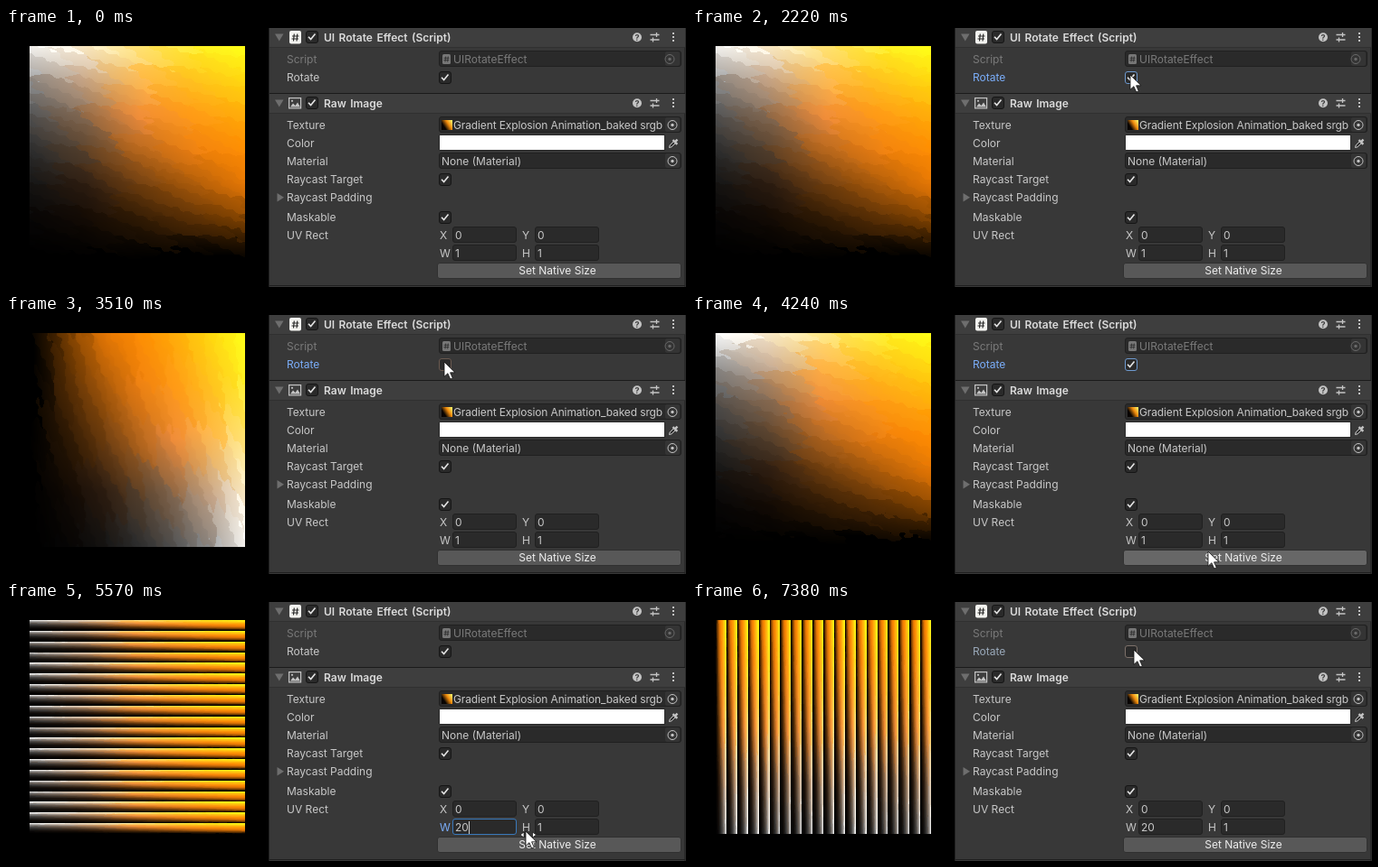
An HTML page with a canvas for the animation above (8000 ms loop, 751 by 287 pixels).

```html
<!DOCTYPE html>
<html lang="en">
<head>
<meta charset="utf-8">
<title>UI rotate effect</title>
<style>
html, body { margin: 0; width: 100%; height: 100%; overflow: hidden; background: #000; }
canvas { position: absolute; left: 26px; top: 20px; }
svg { position: absolute; left: 0; top: 0; }
text { font: 12px Inter, Roboto, sans-serif; fill: #c8c8c8; white-space: pre; }
.bold { font-weight: 600; fill: #dcdcdc; word-spacing: 1.4px; }
.dim { fill: #7a7a7a; }
.bright { fill: #eee; }
.tight { letter-spacing: -.13px; }
</style>
</head>
<body>
<canvas id="pic" width="238" height="237"></canvas>
<svg id="ui" width="751" height="287" viewBox="0 0 751 287">
  <defs>
    <linearGradient id="thumb" x1="0" y1=".6" x2="1" y2="0">
      <stop offset=".15" stop-color="#080402"/>
      <stop offset=".55" stop-color="#f08a0c"/>
      <stop offset=".9" stop-color="#ffe860"/>
    </linearGradient>
  </defs>
</svg>
<script>
const LOOP = 8000, W = 238, H = 237;
const ui = document.getElementById('ui');
const ctx = document.getElementById('pic').getContext('2d');

function add(tag, attrs, parent = ui) {
  const el = document.createElementNS('http://www.w3.org/2000/svg', tag);
  for (const k in attrs) el.setAttribute(k, attrs[k]);
  parent.appendChild(el);
  return el;
}
const rect = (x, y, width, height, fill, more) => add('rect', { x, y, width, height, fill, ...more });
const path = (d, more, parent) => add('path', { d, fill: 'none', ...more }, parent);
function text(x, y, str, more) {
  const el = add('text', { x, y, ...more });
  el.textContent = str;
  return el;
}

// ---- Inspector widgets ----
function box(x, y, w, h, fill = '#2a2a2a', stroke = '#202020') {
  return rect(x + .5, y + .5, w - 1, h - 1, fill, { rx: 2.5, stroke });
}
function check(x, y) {
  const frame = box(x, y, 14, 14, '#2a2a2a', '#151515');
  const tick = path(`M${x + 3} ${y + 6.7}l2.600 2.800 4.900-6`, { stroke: '#e4e4e4', 'stroke-width': 1.6 });
  return { frame, tick };
}
function objectField(y, color = '#c4c4c4', cx = 736) {
  box(478, y, 268, 18);
  rect(728, y + 1, 16, 16, '#343434', { rx: 2 });
  add('circle', { cx, cy: y + 9.5, r: 5, fill: 'none', stroke: color });
  add('circle', { cx, cy: y + 9.5, r: 1.7, fill: color });
}
function numField(x, y, name, value) {
  const label = text(x - 14, y + 14, name);
  const frame = box(x, y, 71, 18);
  const mark = rect(x + 3, y + 2, 7, 14, '#3a72b0', { visibility: 'hidden' });
  return { label, frame, mark, value: text(x + 3, y + 14, value) };
}
function header(y, title) {
  rect(291, y, 459, 21, '#3e3e3e');
  rect(291, y + 21, 459, 1, '#303030');
  path(`M297 ${y + 6.5}h9.5l-4.750 8z`, { fill: '#6e6e6e' });
  check(331, y + 3);
  text(351, y + 15, title, { class: 'bold' });
  add('circle', { cx: 697, cy: y + 10.3, r: 5, fill: '#c4c4c4' });
  text(697, y + 13.8, '?', { 'text-anchor': 'middle', style: 'font-size:9px;font-weight:700;fill:#3e3e3e' });
  path(`M711.5 ${y + 7.5}h10M711.5 ${y + 13}h10M718.5 ${y + 5}v5M714.5 ${y + 10.5}v5`, { stroke: '#c4c4c4', 'stroke-width': 1.3 });
  for (const d of [6, 10, 14]) rect(736, y + d - 1, 2, 2, '#c4c4c4');
}

rect(290, 0, 461, 287, '#383838');
rect(290, 0, 1, 287, '#222');
rect(749, 0, 2, 287, '#2a2a2a');
header(0, 'UI Rotate Effect (Script)');
rect(291, 72, 459, 1, '#1a1a1a');
header(73, 'Raw Image');
rect(291, 285, 459, 1, '#1f1f1f');

// Component icons
rect(313, 3, 13, 14.5, '#f4f4f0', { rx: 2 });
path('M318.300 6.500l-.8 8M321.800 6.500l-.8 8M316 9h7.500M315.500 12h7.500', { stroke: '#2a2a2a', 'stroke-width': 1.2 });
rect(312.6, 77.6, 13, 11.3, 'none', { stroke: '#c4c4c4', 'stroke-width': 1.2 });
path('M314 87.500l3-4 2.500 2.500 2.500-3.500 3 5z', { fill: '#c4c4c4' });
add('circle', { cx: 316, cy: 80.8, r: 1.1, fill: '#c4c4c4' });

const labels = { Script: 39, Rotate: 59, Texture: 112, Color: 132, Material: 152, 'Raycast Target': 172,
  'Raycast Padding': 192, Maskable: 214, 'UV Rect': 234 };
const rows = {};
for (const name in labels) rows[name] = text(310, labels[name], name, name === 'Script' ? { class: 'dim' } : {});
path('M299.500 183v9.500l7.500-4.750z', { fill: '#6e6e6e' });

objectField(25, '#6a6a6a', 733);
rect(482, 29, 9, 11, '#777', { rx: 1.5 });
path('M485.700 31.500l-.7 6M488.300 31.500l-.7 6M483.500 33.300h6M483.300 35.700h6', { stroke: '#2a2a2a', 'stroke-width': .8 });
text(494, 39, 'UIRotateEffect', { class: 'dim' });
objectField(98);
rect(481, 102, 12, 11, 'url(#thumb)');
text(494, 112, 'Gradient Explosion Animation_baked srgb', { class: 'tight' });
rect(478, 118, 268, 18, '#2a2a2a', { rx: 2 });
rect(479, 119, 248, 16, '#fff');
rect(728, 118, 18, 18, '#383838');
path('M732.500 132.500l.7-2.700 4.600-4.600 2 2-4.600 4.600z', { stroke: '#c4c4c4' });
path('M736.500 124l4.800 4.800M739 126.200l2.500-2.500', { stroke: '#c4c4c4', 'stroke-width': 2.4 });
objectField(138);
text(481, 152, 'None (Material)');

const rotate = check(478, 48);
check(478, 161);
check(478, 203);
numField(493, 220, 'X', '0');
numField(584, 220, 'Y', '0');
const fieldW = numField(493, 240, 'W', '1');
const fieldH = numField(584, 240, 'H', '1');
const caret = rect(511, 243, 1, 14, '#d0d0d0');
const button = box(476, 260, 270, 18, '#585858', '#303030');
text(609, 273, 'Set Native Size', { 'text-anchor': 'middle', class: 'bright' });

// ---- Pointer ----
const pointer = add('g', {});
const arrow = path('M0 0V16.300L3.900 12.700L6.700 19L9.300 17.900L6.600 11.800H12Z',
  { fill: '#fff', stroke: '#111', 'stroke-width': .8 }, pointer);
const slide = path('M-2 1v6l-4-3zM7.500 1v6l4-3z', { fill: '#fff', stroke: '#111', 'stroke-width': .7 }, pointer);
const beam = path('M-3-7.500h2.500q.500 0 .5.500v14q0 .500-.500.500H-3M3-7.500H.500M3 7.500H.500', { stroke: '#ddd' }, pointer);

// start, end, steps, from x, y, to x, y
const moves = [
  [290, 290, 1, 530, 272],
  [400, 400, 1, 530, 250],
  [610, 1000, 5, 524, 250, 490, 244],
  [1200, 1310, 2, 481, 165, 474, 90],
  [1400, 1710, 4, 473, 74, 484, 52],
  [3820, 4150, 5, 488, 62, 592, 247],
  [4240, 4240, 1, 570, 262],
  [4460, 4460, 1, 566, 268],
  [4540, 4540, 1, 558, 251],
  [4640, 4640, 1, 557, 251],
  [4840, 4840, 1, 548, 251],
  [5140, 5240, 2, 562, 251, 574, 254],
  [6170, 6970, 9, 570, 238, 489, 53],
  [7060, 7060, 1, 488, 53]
];
function pointerAt(t) {
  const m = moves.filter(s => s[0] <= t).pop();
  if (!m) return null;
  const [t0, t1, n, x0, y0, x1, y1] = m;
  if (n === 1) return [x0, y0];
  const step = Math.min(n - 1, Math.floor((t - t0) / (t1 - t0) * (n - 1) + .05));
  const k = Math.sin(step / (n - 1) * Math.PI / 2);
  return [x0 + (x1 - x0) * k, y0 + (y1 - y0) * k];
}

// ---- Gradient texture: colour ramps from left to right, each running top to bottom ----
const ramps = [
  'ffffff 8a8a8a 505050 2c2c2c 141312 060505 000000',
  'fff4dc c4a488 86684e 56402c 2c1c10 120a04 000000',
  'ffe680 ffb448 f08c38 b4661e 6c3c0e 301a04 000000',
  'ffee28 ffc01e ff9a16 f08010 aa5a0a 582e04 000000',
  'ffff14 ffd80e ffac08 ff8c00 e87804 844400 000000'
].map(r => r.split(' ').map(h => [0, 2, 4].map(i => parseInt(h.slice(i, i + 2), 16))));
const mix = (a, b, k) => a + (b - a) * k;
const clamp = v => Math.max(0, Math.min(.9999, v));
function shade(u, v) {
  const a = clamp(u) * 4, b = clamp(v) * 6, i = Math.floor(a), j = Math.floor(b);
  return [0, 1, 2].map(c => mix(
    mix(ramps[i][j][c], ramps[i][j + 1][c], b - j),
    mix(ramps[i + 1][j][c], ramps[i + 1][j + 1][c], b - j), a - i));
}
function hash(x, y, seed) {
  const s = Math.sin(x * 127.1 + y * 311.7 + seed * 74.7) * 43758.5453;
  return s - Math.floor(s);
}
// Slanted, stretched cells flatten the smooth shading into streaks
const SLANT = .4, COLS = 5, LANES = 19, FLAT = .5;
function facet(u, v, seed) {
  const p = u * COLS + .12 * Math.sin(v * 130 + seed);
  const q = (v - SLANT * u) * LANES + .1 * Math.sin(u * 95 + v * 40);
  let best = 9, cu = u, cv = v;
  for (let i = -1; i < 2; i++) for (let j = -1; j < 2; j++) {
    const gx = Math.floor(p) + i, gy = Math.floor(q) + j;
    const x = gx + hash(gx, gy, seed), y = gy + hash(gx, gy, seed + 5);
    const d = (x - p) ** 2 + (y - q) ** 2;
    if (d < best) { best = d; cu = x / COLS; cv = y / LANES + SLANT * cu; }
  }
  return shade(mix(u, cu, FLAT * .7), mix(v, cv, FLAT));
}
function makeTexture(seed) {
  const cv = document.createElement('canvas');
  cv.width = W; cv.height = H;
  const g = cv.getContext('2d'), img = g.createImageData(W, H);
  for (let y = 0; y < H; y++) for (let x = 0; x < W; x++) {
    const [r, gr, b] = facet(x / W, y / (H - 8), seed);
    img.data.set([r, gr, b, 255], (y * W + x) * 4);
  }
  g.putImageData(img, 0, 0);
  return cv;
}
const textures = [makeTexture(1), makeTexture(2)];
let drawn = '';
function drawPicture(which, tiles, turned) {
  const key = [which, tiles, turned].join();
  if (key === drawn) return;
  drawn = key;
  ctx.setTransform(1, 0, 0, 1, 0, 0);
  ctx.clearRect(0, 0, W, H);
  if (turned) ctx.setTransform(0, -1, -1, 0, W, W);
  const h = (turned ? W : H) / tiles;
  for (let i = 0; i < tiles; i++) ctx.drawImage(textures[which], 0, i * h, W, h);
}

// ---- State ----
const show = (el, on) => el.setAttribute('visibility', on ? 'visible' : 'hidden');
const between = (t, a, b) => t >= a && t < b;
const over = (p, x, y, w, h) => !!p && between(p[0], x, x + w) && between(p[1], y, y + h);

function render(t) {
  const p = pointerAt(t);
  const off = between(t, 2310, 3620) || t >= 7380;
  const editing = between(t, 5040, 7280), selected = editing && t < 5460;
  const value = t < 5460 ? '1' : t < 5570 ? '2' : '20';
  drawPicture(t < 3620 ? 0 : 1, Number(value), off);

  const focus = between(t, 2220, 5040);
  rows.Rotate.style.fill = focus ? '#7baefa' : t >= 7280 ? '#9aa9ba' : '';
  show(rotate.tick, !off);
  const onCheck = over(p, 478, 48, 14, 14);
  rotate.frame.setAttribute('stroke', focus ? (off ? '#6b5a50' : '#6f9bd0') : onCheck ? '#7d716a' : '#151515');

  const inW = over(p, 493, 240, 71, 18), inH = over(p, 584, 240, 71, 18);
  const onLabel = over(p, 478, 240, 15, 18) || over(p, 568, 240, 16, 18);
  fieldW.label.style.fill = editing ? '#7baefa' : '';
  fieldW.value.textContent = value;
  fieldW.frame.setAttribute('stroke', editing ? '#3a79bb' : inW ? '#656565' : '#202020');
  fieldH.frame.setAttribute('stroke', inH ? '#656565' : '#202020');
  show(fieldW.mark, selected);
  show(caret, editing && !selected);
  caret.setAttribute('x', value === '2' ? 504 : 511);
  button.setAttribute('fill', over(p, 476, 260, 270, 18) ? '#676767' : '#585858');

  const typing = inW || inH;
  show(arrow, p && !typing);
  show(slide, p && onLabel);
  show(beam, p && typing);
  if (p) pointer.setAttribute('transform', `translate(${Math.round(p[0])} ${Math.round(p[1])})`);
}

function tick() {
  render(performance.now() % LOOP);
  requestAnimationFrame(tick);
}
tick();
</script>
</body>
</html>
```
